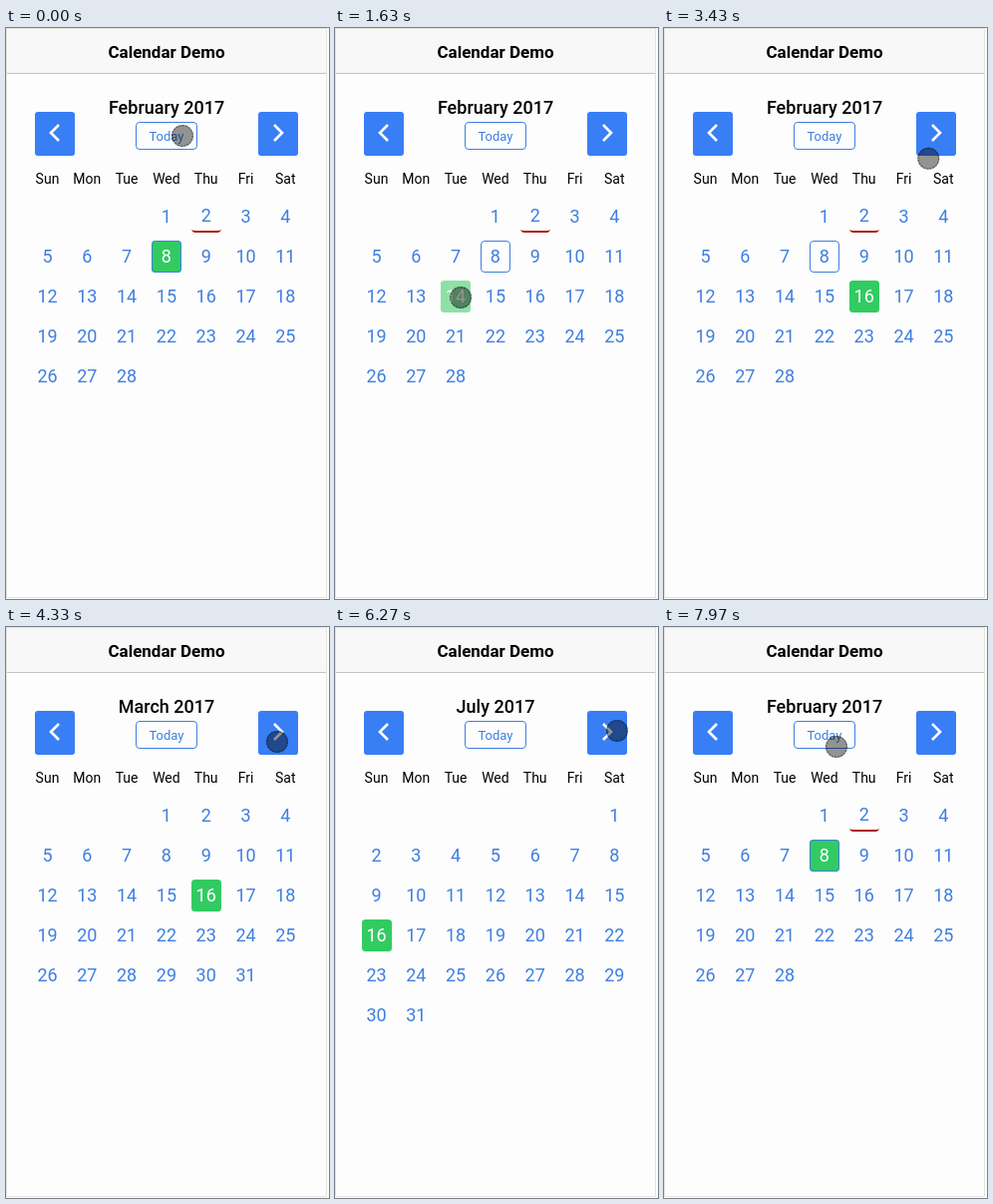
An HTML page that plays this animation: 324x572 px, repeating every 8 s.

```html
<!DOCTYPE html>
<html lang="en">
<head>
<meta charset="utf-8">
<title>Calendar Demo</title>
<style>
  html, body { margin: 0; width: 100%; height: 100%; overflow: hidden; background: #fdfdfd; }
  svg { display: block; width: 324px; height: 572px; font-family: Roboto, sans-serif; }
  text { text-anchor: middle; }
  .heading { font-weight: 500; fill: #000; }
  .day { font-size: 18px; fill: #3f7fe0; }
  .weekday { font-size: 14px; fill: #000; }
  .outline { fill: none; stroke: #3f7fe0; }
  .nav { fill: #387ef5; }
  .chevron { fill: none; stroke: #fff; stroke-width: 2.6; }
  .selected rect:first-child { fill: #32cb62; }
  .selected text { fill: #fff; }
</style>
</head>
<body>
<svg viewBox="0 0 324 572">
  <rect width="324" height="572" fill="#fdfdfd"/>
  <rect width="322" height="45" fill="#f8f8f8"/>
  <path d="M0 45.5H322" stroke="#c4c4be"/>
  <path d="M.5 0V570.5H321.5V0M0 .5H322" fill="none" stroke="#e4e4de"/>
  <text class="heading" x="161" y="30" font-size="17" style="font-weight:600">Calendar Demo</text>
  <text class="heading" id="month" x="161" y="86" font-size="18"></text>
  <rect class="outline" x="130.5" y="94.5" width="61" height="27" rx="3.5"/>
  <text x="161" y="113" font-size="13" fill="#3f7fe0">Today</text>
  <rect class="nav" x="29" y="84" width="40" height="44" rx="3"/>
  <rect class="nav" x="253" y="84" width="40" height="44" rx="3"/>
  <path class="chevron" d="M53 97L45 105L53 113M269 97L277 105L269 113"/>
  <g id="weekdays"></g>
  <g id="days"></g>
  <g id="cursor">
    <circle r="11" fill-opacity=".42"/>
    <circle r="10.3" fill="none" stroke="#000" stroke-opacity=".4" stroke-width="1.2" stroke-dasharray="2 1.2"/>
  </g>
</svg>
<script>
const LOOP = 8000, YEAR = 2017, FEBRUARY = 1, TODAY = 8, EVENT_DAY = 2;
const PRESS = 90, FADE = 100, PRESSED_OPACITY = 0.55;
const $ = id => document.getElementById(id);
const clamp = value => Math.min(1, Math.max(0, value));
const ease = p => p * p * (3 - 2 * p);

function dayCenter(day, month) {
  const slot = day - 1 + new Date(YEAR, month, 1).getDay();
  return { x: 41.5 + slot % 7 * 39.8, y: 189 + Math.floor(slot / 7) * 40 };
}

// What the calendar shows, changed by each tap
const states = [{ at: 0, month: FEBRUARY, day: TODAY }];
const tap = (at, change) => states.push({ ...states.at(-1), pressed: false, at, ...change });
tap(1570, { day: 14, pressed: true });
tap(2570, { day: 15, pressed: true });
tap(3050, { day: 16, pressed: true });
for (let i = 1; i <= 5; i++) tap(3390 + i * 560, { month: FEBRUARY + i });
tap(7300, { month: FEBRUARY, day: TODAY });

// The pointer glides to each place and rests there
const onDay = day => {
  const { x, y } = dayCenter(day, FEBRUARY);
  return { x: x + 5, y: y + 1 };
};
const home = { x: 177, y: 108 };
const glides = [
  { from: 180, to: 1350, place: onDay(14) },
  { from: 2180, to: 2480, place: onDay(15) },
  { from: 2750, to: 2960, place: onDay(16) },
  { from: 3150, to: 3500, place: { x: 272, y: 115 } },
  { from: 4700, to: 5900, place: { x: 283, y: 104 } },
  { from: 6680, to: 7200, place: { x: 171, y: 111 } },
  { from: 7600, to: 7960, place: { x: 173, y: 120 } }
];

function pointerAt(time) {
  let { x, y } = home;
  for (const { from, to, place } of glides) {
    const p = ease(clamp((time - from) / (to - from)));
    x += (place.x - x) * p;
    y += (place.y - y) * p;
  }
  return [x, y];
}

$('weekdays').innerHTML = ['Sun', 'Mon', 'Tue', 'Wed', 'Thu', 'Fri', 'Sat']
  .map((name, i) => `<text class="weekday" x="${dayCenter(i + 1, 9).x}" y="156">${name}</text>`).join('');

function dayCell(day, month, selected) {
  const { x, y } = dayCenter(day, month);
  const left = Math.round(x - 15), top = y - 16;
  const hasEvent = month === FEBRUARY && day === EVENT_DAY;
  let shapes = '';
  if (selected)
    shapes += `<rect x="${left}" y="${top}" width="30" height="32" rx="3.5"/>`;
  if (month === FEBRUARY && day === TODAY)
    shapes += `<rect class="outline" x="${left + .5}" y="${top + .5}" width="29" height="31" rx="3.5"/>`;
  if (hasEvent)
    shapes += `<path d="M${left} ${top + 29}q1 1 4 1h22q3 0 4-1q-1 3-4 3h-22q-3 0-4-3" fill="#b01c14"/>`;
  return `<g class="${selected ? 'selected' : ''}">${shapes}
    <text class="day" x="${x}" y="${y + (hasEvent ? 5 : 6)}">${day}</text></g>`;
}

function drawMonth({ month, day }) {
  const name = new Date(YEAR, month, 1).toLocaleString('en', { month: 'long' });
  const count = new Date(YEAR, month + 1, 0).getDate();
  $('month').textContent = `${name} ${YEAR}`;
  $('days').innerHTML = Array.from({ length: count },
    (_, i) => dayCell(i + 1, month, i + 1 === day)).join('');
}

let shown;
function frame() {
  const time = performance.now() % LOOP;
  const state = states.findLast(s => s.at <= time);
  if (state !== shown) drawMonth(state);
  shown = state;

  const release = clamp((time - state.at - PRESS) / FADE);
  const opacity = state.pressed ? PRESSED_OPACITY + (1 - PRESSED_OPACITY) * release : 1;
  document.querySelector('.selected').setAttribute('opacity', opacity);
  $('cursor').setAttribute('transform', `translate(${pointerAt(time)})`);
  requestAnimationFrame(frame);
}
frame();
</script>
</body>
</html>
```
